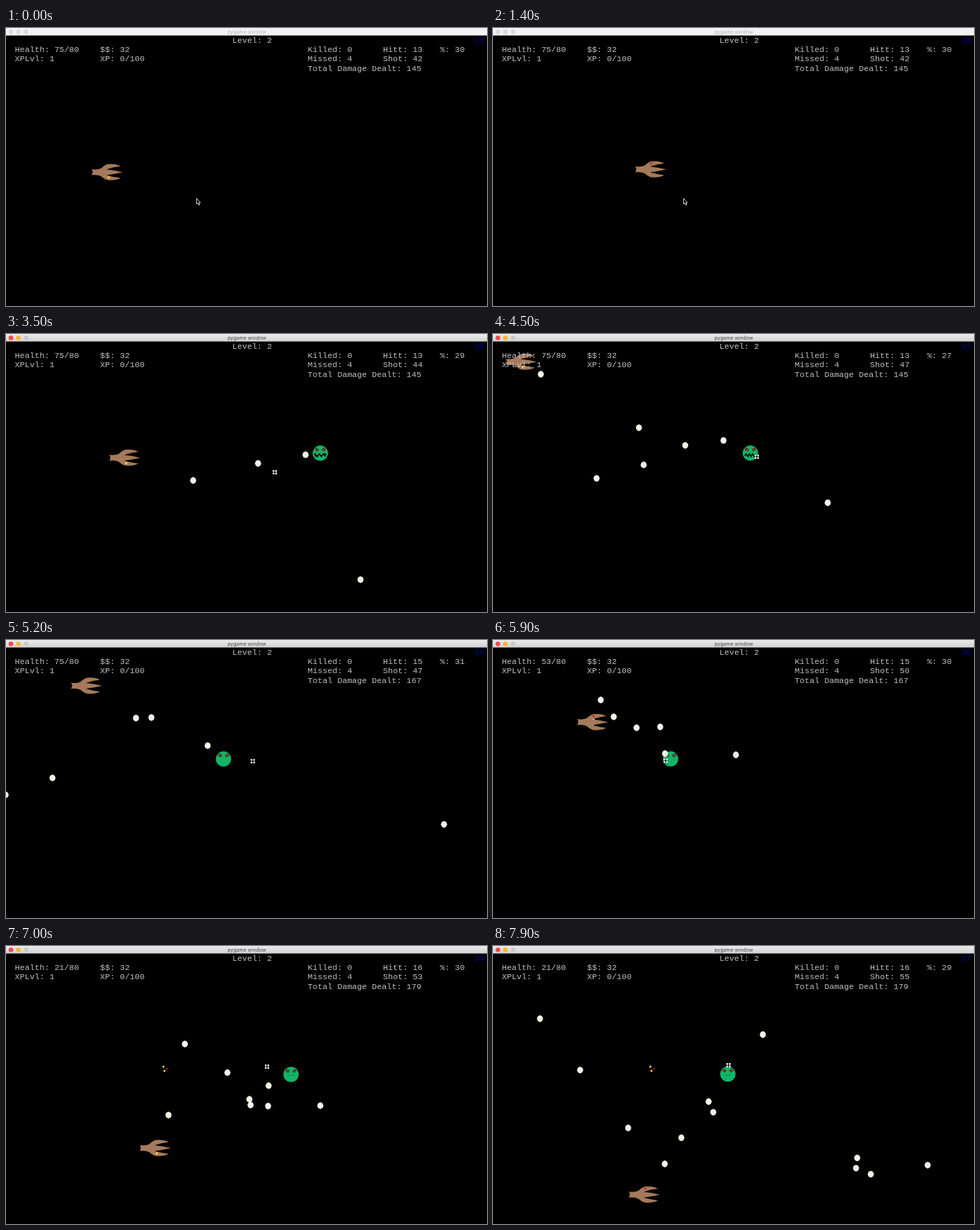
An HTML page for the animation above (8000 ms loop, 680x394 px).

```html
<!DOCTYPE html>
<html lang="en">
<head>
<meta charset="utf-8">
<title>pygame window</title>
<style>
  html, body { margin: 0; width: 100%; height: 100%; overflow: hidden; background: #000; }
  svg { display: block; width: 680px; height: 394px; }
  .hud text { font: 11.65px "Liberation Mono", "Courier New", monospace; fill: #bfbfbf; white-space: pre; }
  .hud #fps { fill: #000088; }
  #title { font: 7.1px Inter, "Open Sans", sans-serif; text-anchor: middle; }
  .off #title { fill: #b4b4b4; }
  .on #title { fill: #484848; }
  .off .light { fill: #dadada; }
  .off #bar { fill: #f2f2f2; }
  #shots { fill: #f2f2e8; }
</style>
</head>
<body>
<svg id="stage" class="off" viewBox="0 0 680 394">
  <defs>
    <linearGradient id="chrome" x2="0" y2="1">
      <stop stop-color="#ebebeb"/><stop offset="1" stop-color="#d2d2d2"/>
    </linearGradient>
    <g id="eye">
      <ellipse rx="2.6" ry="2" fill="#7d3f2c" stroke="#1d3a22" stroke-width=".7"/>
      <circle r="1" fill="#b8242b"/>
    </g>
    <g id="head">
      <circle r="10.8" fill="#13b467"/>
      <use href="#eye" transform="translate(-5 -5) rotate(25)"/>
      <use href="#eye" transform="translate(5 -5) rotate(-25)"/>
    </g>
  </defs>
  <rect width="680" height="394"/>

  <g id="debris">
    <path d="M226 175l3-2" stroke="#7a1717" stroke-width="2.2"/>
    <path d="M221 171h3m-1.5-1.5v3M222.5 177h3m-1.5-1.5v3" stroke="#e6da45" stroke-width="1.6"/>
  </g>
  <g id="foeA">
    <use href="#head"/>
    <g id="open">
      <path d="M-9 1L-6 0-4 2-1 0 2 2 5 0 9 1 7 5 4 4 2 6-1 4-4 6-7 5Z" fill="#0a0f0b"/>
      <path d="M-6 1l1 2 1.5-1M0 1l1 2 1-1M-3 5l1-2 1 1M3 5l1-2 1 1" fill="#e9eee4"/>
    </g>
    <path id="zigzag" d="M-8 4l2-3 2.5 4 2-4 2.5 4 2-4 2.5 4 2-3" fill="none" stroke="#07140c" stroke-width="1.7"/>
  </g>
  <g id="foeB">
    <use href="#head"/>
    <path d="M-6 1.5Q0 .5 6 1.5" fill="none" stroke="#0d9152"/>
  </g>
  <g id="shots"></g>
  <g id="ship">
    <path fill="#a47a5a" d="M-22-4Q-13-2.5-8-5.5Q-3-10.5 1-11Q12-12 19-8Q9-7.5-1-3.5Q11-2.5 22 .5Q11 3-1 4.5Q9 7.5 19 8.5Q12 12.5 1 11.5Q-3 11-8 6.5Q-13 3.5-22 4.5Q-19 0-22-4Z"/>
    <circle id="redSpot" cx="1" cy="-8" r="1.8" fill="#c8323a"/>
    <g id="goldSpot"><circle cx="2" cy="8" r="2" fill="#d99a2b"/><circle cx="2" cy="8" r="1" fill="#fff2b0"/></g>
  </g>

  <g class="hud">
    <text x="320" y="21">Level: 2</text>
    <text id="fps" x="662" y="21"></text>
    <text id="health" x="12.5" y="34"></text>
    <text x="133" y="34">$$: 32</text>
    <text x="12.5" y="47.3">XPLvl: 1</text>
    <text x="133" y="47.3">XP: 0/100</text>
    <text x="426.5" y="34">Killed: 0</text>
    <text id="hits" x="533" y="34"></text>
    <text id="rate" x="613.5" y="34"></text>
    <text x="426.5" y="47.3">Missed: 4</text>
    <text id="fired" x="533" y="47.3"></text>
    <text id="damage" x="426.5" y="60.7"></text>
  </g>

  <rect id="bar" width="680" height="10.6" fill="url(#chrome)"/>
  <circle class="light" cx="7" cy="5.5" r="3.3" fill="#fb464e"/>
  <circle class="light" cx="17.5" cy="5.5" r="3.3" fill="#fab62d"/>
  <circle class="light" cx="28.5" cy="5.5" r="3.3" fill="#cacaca"/>
  <text id="title" x="340.5" y="8.2">pygame window</text>

  <path id="arrow" d="M269.5 241.5v8l1.8-1.5 1.4 3 1.3-.6-1.3-2.8h2.2Z" fill="#000" stroke="#e4e4e4" stroke-width=".9"/>
  <g id="aim">
    <path d="M-3 0h6M0-3v6" stroke="#000" stroke-width="1.4"/>
    <path d="M-3-3h2.4v2.4h-2.4zM.6-3h2.4v2.4h-2.4zM-3 .6h2.4v2.4h-2.4zM.6 .6h2.4v2.4h-2.4z" fill="#f4f4f4"/>
  </g>
</svg>
<script>
const $ = id => document.getElementById(id);
// Time is counted in game steps of 100 ms
const STEPS = 80, STEP_MS = 100, FOCUS = 20, SPEED = 21.1, REACH = 24;

// Key points: step, x, y
const ship = [
  [0, 143, 204], [5, 154, 219], [14, 223, 200], [20, 222, 199], [32, 202, 198],
  [35, 168, 175], [45, 40, 39], [50, 85, 52], [54.5, 150, 80], [57.2, 138, 89.5],
  [59, 141, 116], [62, 170, 142], [68, 196, 265], [70, 211, 286], [72, 214, 313], [76, 214, 350], [79, 214, 352]
];
const aim = [
  [20, 310, 246], [32, 380, 225], [35, 380, 196], [38, 376, 176], [45, 373, 174], [54, 342, 171],
  [55.6, 270, 171], [57.2, 276, 171], [59, 244, 171], [68, 321, 171], [70, 369, 171], [73, 348, 171], [79, 333, 169]
];
const foeA = { from: 22, to: 61, path: [[22, 549, 169], [61, 235, 168.5]] };
const foeB = { from: 60, to: 80, path: [[59, 478, 182], [70, 403, 182], [79, 332, 181.5]] };

// Steps at which each side shoots
const shipFire = [20, 32, 38.1, 40, 44.15, 54.2, 55.65, 57.2, 59, 59.6, 68, 72.65, 76.6];
const foeFire = [28.2, 33.4, 41.9, 49.95, 58.25, 59.2, 63.7, 67.6, 71.8, 75.6];

function along(path, t) {
  const i = path.findIndex(p => p[0] >= t);
  if (i < 1) return (i ? path[path.length - 1] : path[0]).slice(1);
  const [a, b] = [path[i - 1], path[i]];
  const k = (t - a[0]) / (b[0] - a[0]);
  return [a[1] + (b[1] - a[1]) * k, a[2] + (b[2] - a[2]) * k];
}
const near = (a, b) => Math.hypot(a[0] - b[0], a[1] - b[1]) < REACH;
const alive = (foe, n) => n >= foe.from && n <= foe.to;

// A shot flies straight from one path to another until it touches something
function makeShot(fire, origin, goal, touches) {
  const [x, y] = along(origin, fire), [gx, gy] = along(goal, fire);
  const turn = Math.atan2(gy - y, gx - x);
  const at = n => {
    const d = SPEED * (n - fire);
    return [x + d * Math.cos(turn), y + d * Math.sin(turn)];
  };
  let end = Math.ceil(fire);
  while (end < STEPS && !touches(at(end), end)) end++;
  const dot = document.createElementNS("http://www.w3.org/2000/svg", "path");
  dot.setAttribute("d", "M0-4.9L3.2-3.3 4.4 0 3.2 3.3 0 4.9-3.2 3.3-4.4 0-3.2-3.3Z");
  $("shots").append(dot);
  return { fire, end, at, dot };
}
const shipShots = shipFire.map(t => makeShot(t, ship, aim,
  (p, n) => [foeA, foeB].some(foe => alive(foe, n) && near(p, along(foe.path, n)))));
const foeShots = foeFire.map(t => makeShot(t, (t < 59 ? foeA : foeB).path, ship,
  (p, n) => near(p, along(ship, n))));

const show = (el, on) => { el.style.display = on ? "" : "none"; };
const move = (el, p) => el.setAttribute("transform", `translate(${p})`);
const write = (id, text) => { $(id).textContent = text; };

function draw(n) {
  $("stage").setAttribute("class", n < FOCUS ? "off" : "on");
  show($("arrow"), n < FOCUS);
  show($("aim"), n >= FOCUS);
  move($("aim"), along(aim, n));

  move($("ship"), along(ship, n));
  show($("goldSpot"), n % 5 < 2);
  show($("redSpot"), n % 5 > 2);

  move($("foeA"), along(foeA.path, n));
  move($("foeB"), along(foeB.path, n));
  show($("foeA"), alive(foeA, n));
  show($("foeB"), alive(foeB, n));
  show($("open"), n < 40);
  show($("zigzag"), n >= 40 && n < 50);
  show($("debris"), n > foeA.to);

  for (const { fire, end, at, dot } of [...shipShots, ...foeShots]) {
    show(dot, n >= fire && n < end);
    move(dot, at(n));
  }

  // The blow that removes a foe is not scored
  const scored = shipShots.filter(s => s.end <= n && s.end !== foeA.to).length;
  const taken = foeShots.filter(s => s.end <= n).length;
  const fired = 42 + shipFire.filter(t => t < n).length;
  const hits = 13 + scored;
  write("health", `Health: ${75 - 17 * taken - 5 * taken ** 2}/80`);
  write("hits", `Hitt: ${hits}`);
  write("fired", `Shot: ${fired}`);
  write("rate", `%: ${Math.floor(100 * hits / fired)}`);
  write("damage", `Total Damage Dealt: ${145 + Math.floor(scored * 34 / 3)}`);
  write("fps", Math.floor(36.5 + 1.5 * Math.cos((n - 35) * Math.PI / 26)));
}

const start = performance.now();
function tick() {
  draw(Math.floor((performance.now() - start) / STEP_MS) % STEPS);
  requestAnimationFrame(tick);
}
tick();
</script>
</body>
</html>
```
